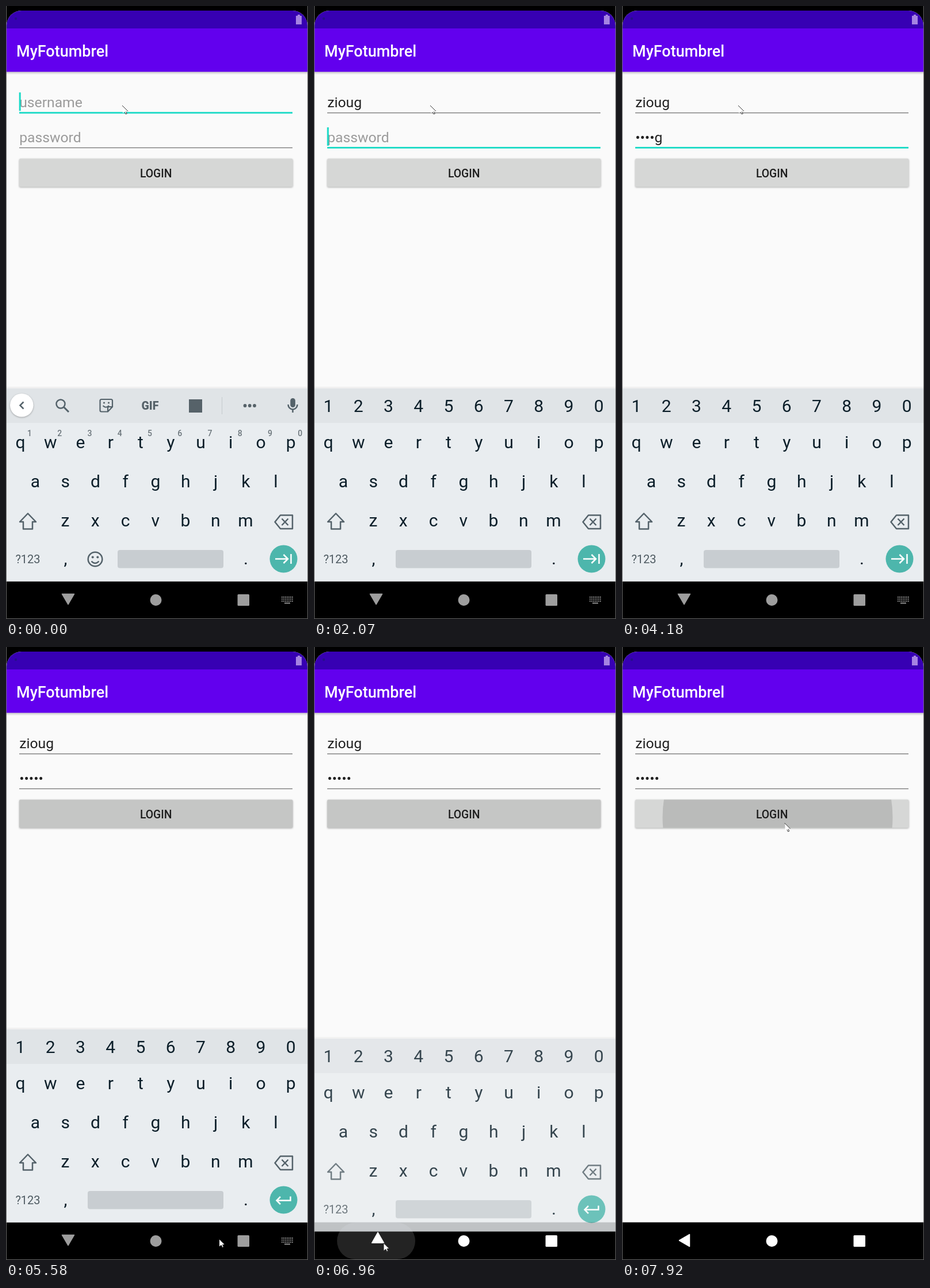
An HTML page that plays this animation: 525 px wide and 1066 px high, repeating every 8000 ms.

```html
<!DOCTYPE html>
<html lang="en">
<head>
<meta charset="utf-8">
<title>Login screen</title>
<style>
  html, body { margin: 0; width: 100%; height: 100%; overflow: hidden; background: #000; }
  svg { display: block; width: 525px; height: 1066px; font-family: Roboto, "Noto Sans", sans-serif; }
  .mid { text-anchor: middle; }
  .key { font-size: 30px; fill: #0b1e29; text-anchor: middle; }
  .digit { font-size: 14px; font-weight: 500; fill: #6b757b; text-anchor: middle; }
  .word { font-size: 24.6px; fill: #566269; text-anchor: middle; }
  .field { font-size: 24.7px; }
  .line { fill: none; stroke: #54626a; stroke-width: 2.5; }
  .white { fill: none; stroke: #fff; stroke-width: 2.5; }
  .soft { filter: drop-shadow(0 1px 1.5px rgba(0, 0, 0, .3)); }
</style>
</head>
<body>
<svg viewBox="0 0 525 1066">
  <defs>
    <linearGradient id="shade" x2="0" y2="1">
      <stop stop-color="#000" stop-opacity=".2"/>
      <stop offset="1" stop-color="#000" stop-opacity="0"/>
    </linearGradient>
    <clipPath id="buttonClip"><rect x="23" y="265.5" width="475.5" height="49" rx="2"/></clipPath>
  </defs>

  <rect width="525" height="1066"/>
  <path d="M1 1001V34A26 26 0 0 1 27 8H498A26 26 0 0 1 524 34V1001Z" fill="#fafafa"/>
  <path d="M1 40V34A26 26 0 0 1 27 8H498A26 26 0 0 1 524 34V40Z" fill="#3700b3"/>
  <rect x="1" y="39" width="523" height="75.5" fill="#6200ee"/>
  <rect x="1" y="114.5" width="523" height="5" fill="url(#shade)"/>
  <circle cx="17" cy="22" r="2.2" fill="#26108a"/>
  <path d="M504 17h3v-2h4v2h3v15h-10z" fill="#a583e2"/>
  <text x="18" y="88" font-size="27" font-weight="500" fill="#fff">MyFotumbrel</text>

  <text id="user" class="field" x="23.2" y="176"/>
  <rect id="compose" x="23.5" y="178" height="1.3" fill="#212121"/>
  <rect id="userLine" x="23"  width="475"/>
  <text id="pass" class="field" x="23.2" y="237"/>
  <rect id="passLine" x="23" width="475"/>
  <rect id="caret" width="3" height="32" fill="#1adac6"/>

  <rect id="button" class="soft" x="23" y="265.5" width="475.5" height="49" rx="2"/>
  <g clip-path="url(#buttonClip)"><circle id="press" cx="270.5" cy="296" r="200" fill="#babbba"/></g>
  <text class="mid" x="260.7" y="298" font-size="19.3" font-weight="500" fill="#1c1c1c">LOGIN</text>

  <rect x="1" y="1000.5" width="523" height="65.5"/>
  <rect id="ripple" x="40" y="1001" width="136" height="64" rx="32" fill="#232323"/>
  <g id="nav">
    <path id="back" d="M97.5 1022.5H118.5L108 1040.5Z" stroke-width="1.5" stroke-linejoin="round"/>
    <circle cx="260.5" cy="1033" r="10"/>
    <rect x="402.5" y="1023" width="20.5" height="20" rx="1.5"/>
  </g>
  <g id="imeIcon" fill="#9e9e9e"></g>

  <g id="board">
    <rect x="1" y="662" width="523" height="3" fill="#000" opacity=".04"/>
    <rect x="1" y="665" width="523" height="335.5" fill="#e9edf0"/>
    <rect x="1" y="665" width="523" height="60" fill="#e0e4e7"/>
    <g id="keys"></g>
    <path class="line" d="M38 882.5L52 897H46V909.5H30V897H24Z" stroke-linejoin="round"/>
    <path class="line" d="M477 885.5H498V909H477L467.5 897.3Z M479.5 891.5l11 11.5m0 -11.5l-11 11.5" stroke-linejoin="round"/>
    <text class="mid" x="38" y="969" font-size="20" fill="#4f5b62">?123</text>
    <text class="key" x="103.5" y="971" font-size="28">,</text>
    <text class="key" x="417" y="971" font-size="28">.</text>
    <rect id="space" y="946" height="31.5" rx="4" fill="#c8cdd1"/>
    <circle cx="482.5" cy="961.5" r="24" fill="#4db6ac"/>
    <path id="next" class="white" d="M468 961.5H490M482.5 954l7.5 7.5l-7.5 7.5M495.5 953v17"/>
    <path id="enter" class="white" d="M494.5 955.5V962.5H470.5M477 956l-6.5 6.5l6.5 6.5"/>

    <g id="letterMode">
      <g id="digits"></g>
      <g class="line">
        <circle cx="155" cy="962" r="12.3"/>
        <path d="M148.5 965.5q6.5 7 13 0"/>
      </g>
      <circle cx="150.7" cy="958.5" r="2" fill="#54626a"/>
      <circle cx="159.3" cy="958.5" r="2" fill="#54626a"/>
      <circle class="soft" cx="27.3" cy="694.3" r="20.3" fill="#fff"/>
      <path id="chevron" class="line" stroke-width="2.3"/>
      <g fill="#54626a">
        <rect x="494.3" y="682" width="8.6" height="16" rx="4.3"/>
        <path class="line" stroke-width="2.2" d="M490.5 693a8 8.5 0 0 0 16 0M498.5 701v6"/>
      </g>
    </g>
    <g id="tools" fill="#566269">
      <g class="line">
        <circle cx="95" cy="692" r="7.5"/>
        <path d="M100.5 697.5l8.5 8.5" stroke-width="3"/>
        <path d="M166 684H182.5Q185 684 185 686.5V697L177 705.5H166Q163.500 705.5 163.500 703V686.500Q163.500 684 166 684ZM185 697H179Q177 697 177 699V705.500" stroke-width="2.200"/>
        <path d="M168.500 695q5 5.500 10.500 0" stroke-width="2"/>
      </g>
      <circle cx="170.500" cy="690" r="1.600"/>
      <circle cx="178.500" cy="690" r="1.600"/>
      <text class="mid" x="250.500" y="701.500" font-size="19.500" font-weight="900">GIF</text>
      <rect x="318" y="684" width="23" height="23"/>
      <rect x="375" y="680" width="1" height="30" fill="#c5cace"/>
      <circle cx="415.500" cy="695" r="2.900"/>
      <circle cx="423.700" cy="695" r="2.900"/>
      <circle cx="432" cy="695" r="2.900"/>
    </g>
    <g id="words">
      <path d="M182.500 678v33M336 678v33" stroke="#c5cace"/>
    </g>
    <g id="numbers"></g>
  </g>

  <path d="M.5 0V1065.500H524.500V0" fill="none" stroke="#686868"/>
  <g id="mouse">
    <path d="M1 1V13.500L4 10.800L6 15.500L8.200 14.600L6.200 10H10Z" fill="#fff"/>
    <path d="M0 0L10 10M4.500 11.500l1.500 3.500l2.200 -.8l-1.600 -3.600" fill="none" stroke="#222" stroke-width=".9"/>
  </g>
</svg>
<script>
const LOOP = 8000, PITCH = 52.25;
const $ = id => document.getElementById(id);
const set = (el, attrs) => { for (const k in attrs) el.setAttribute(k, attrs[k]); };
const show = (id, on) => set($(id), { display: on ? 'inline' : 'none' });

function add(parent, tag, attrs, text = '') {
  const el = document.createElementNS('http://www.w3.org/2000/svg', tag);
  set(el, attrs);
  el.textContent = text;
  return $(parent).appendChild(el);
}
function row(parent, chars, x, y, cls = 'key') {
  [...chars].forEach((c, i) => add(parent, 'text', { class: cls, x: x + i * PITCH, y }, c));
}

row('keys', 'qwertyuiop', 25, 769);
row('keys', 'asdfghjkl', 51, 836.5);
row('keys', 'zxcvbnm', 103, 904.5);
row('digits', '1234567890', 41, 748, 'digit');
row('numbers', '1234567890', 25, 706);
const words = [114, 259, 404].map(x => add('words', 'text', { class: 'word', x, y: 704.5 }));
for (let r = 0; r < 3; r++)
  for (let c = 0; c < 7; c++)
    add('imeIcon', 'rect', { x: 479 + c * 3, y: 1027 + r * 3.5, width: 1.8, height: 1.8 });
add('imeIcon', 'rect', { x: 484, y: 1037.500, width: 10, height: 1.800 });

// Each step changes part of the state and holds until the next one.
const steps = [
  [0, { user: '', pass: '', focus: 'user', caret: true, words: '', mouse: [202, 173],
        slide: 0, fade: 1, turn: 0, ripple: 0, nav: false, press: false }],
  [120, { user: 'z', words: 'z x s' }],
  [260, { user: 'zi', words: 'zi zip sit' }],
  [540, { user: 'zio', words: 'zio zip trio' }],
  [680, { user: 'ziou', words: 'ziou zips your' }],
  [820, { user: 'zioug' }],
  [960, { words: 'zioug zing ring' }],
  [1390, { caret: false }],
  [1920, { caret: true }],
  [2070, { focus: 'pass' }],
  [2500, { caret: false }],
  [3070, { caret: true }],
  [3220, { pass: '•i' }],
  [3370, { pass: '•••u' }],
  [3620, { pass: '••••g' }],
  [4180, { caret: false }],
  [4750, { pass: '•••••', focus: 'button' }],
  [5580, { mouse: [370, 1029] }],
  [5730, { mouse: null }],
  [6320, { mouse: [122.500, 1047] }],
  [6440, { mouse: [122, 1041] }],
  [6560, { mouse: [120.500, 1036] }],
  [6840, { slide: 4, fade: .95, turn: 20, ripple: .6, nav: true }],
  [6960, { slide: 16, fade: .82, turn: 60, ripple: 1 }],
  [7110, { fade: 0, turn: 90, mouse: [130, 1010] }],
  [7240, { ripple: .4, mouse: [215, 720] }],
  [7360, { ripple: 0, mouse: [284, 456] }],
  [7500, { mouse: [272, 363] }],
  [7650, { mouse: [279, 322] }],
  [7770, { mouse: [282.500, 306] }],
  [7920, { press: true }]
];

function drawField(id, hint, s, y) {
  const el = $(id), active = s.focus === id;
  el.textContent = s[id] || hint;
  set(el, { fill: s[id] ? '#212121' : '#9b9b9b' });
  set($(id + 'Line'), active
    ? { y: y - 1, height: 2.800, fill: '#1adac6' }
    : { y: y - .2, height: 1.400, fill: '#7d7d7d' });
  const width = s[id] ? el.getComputedTextLength() : 0;
  if (active) set($('caret'), { x: 22.700 + width, y: y - 35 });
  return width;
}

function draw(s) {
  const typing = s.focus === 'user', width = drawField('user', 'username', s, 185.300);
  drawField('pass', 'password', s, 246);
  show('caret', s.caret && s.focus !== 'button');
  show('compose', typing && s.user);
  set($('compose'), { width: Math.max(0, width - 1) });
  set($('button'), { fill: s.focus === 'button' && !s.press ? '#c5c6c5' : '#d6d7d6' });
  show('press', s.press);

  show('letterMode', typing);
  show('tools', typing && !s.words);
  show('words', typing && s.words);
  show('numbers', !typing);
  show('next', s.focus !== 'button');
  show('enter', s.focus === 'button');
  set($('space'), typing ? { x: 194, width: 184 } : { x: 142, width: 236 });
  set($('chevron'), { d: s.words ? 'M24 688.500l6 6l-6 6' : 'M30.500 688.500l-6 6l6 6' });
  s.words.split(' ').forEach((w, i) => words[i].textContent = w);
  set($('board'), { transform: `translate(0 ${s.slide})`, opacity: s.fade });

  const tone = s.nav ? '#fff' : '#9e9e9e';
  set($('nav'), { fill: tone });
  set($('back'), { transform: `rotate(${s.turn} 108 1032)`, stroke: tone });
  set($('ripple'), { opacity: s.ripple });
  show('imeIcon', !s.nav);
  show('mouse', s.mouse);
  if (s.mouse) set($('mouse'), { transform: `translate(${s.mouse})` });
}

let last = -1;
function tick() {
  const t = performance.now() % LOOP;
  const n = steps.filter(([at]) => at <= t).length;
  if (n !== last) draw(Object.assign({}, ...steps.slice(0, n).map(step => step[1])));
  last = n;
  requestAnimationFrame(tick);
}
tick();
</script>
</body>
</html>
```
